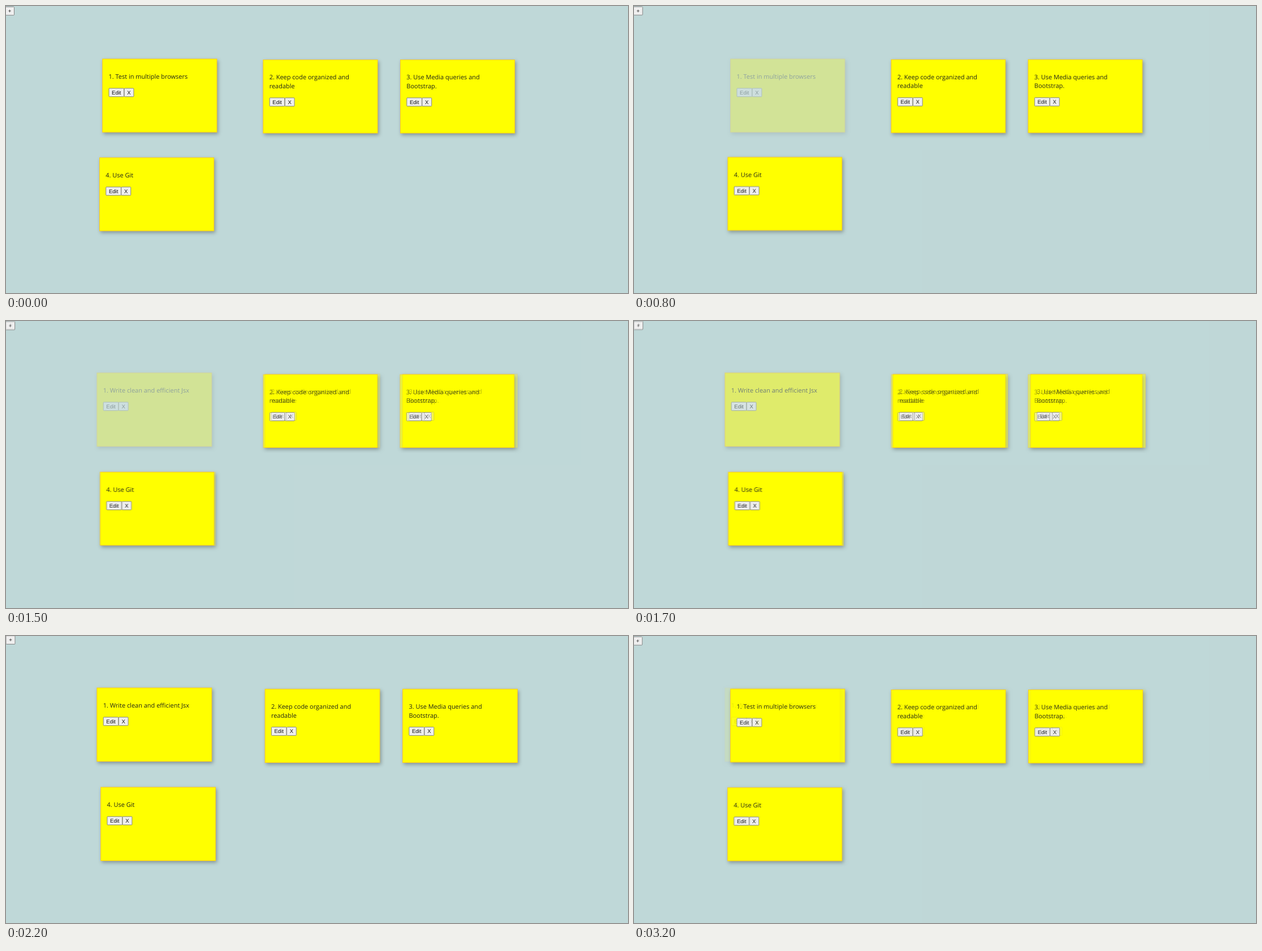
Write an HTML page that moves like this. It is 1100 px wide and 509 px high and loops after 3.3 s.

```html
<!DOCTYPE html>
<html lang="en">
<head>
<meta charset="utf-8">
<title>Sticky notes</title>
<style>
  html, body { margin: 0; width: 100%; height: 100%; overflow: hidden; background: #bfd8d8; }
  svg { display: block; width: 100%; height: 100%; }
  text { font: 10.97px "Open Sans", sans-serif; fill: #212518; text-rendering: geometricPrecision; }
  .label { font: 9.52px "Liberation Sans", Arial, sans-serif; fill: #111; text-anchor: middle; }
  .stage { fill: #bfd8d8; }
  .paper { fill: #ff0; stroke: #ffcb1a; stroke-width: 1px; filter: drop-shadow(2px 3.5px 3px rgba(0, 0, 0, .3)); }
  .button { fill: #efefef; stroke: #858585; stroke-width: 1px; }
</style>
</head>
<body>
<svg id="board" viewBox="0 0 1100 509"></svg>
<script>
const board = document.getElementById('board');
const LINE = 15.4, STEP = 100, STEPS = 11;

const rect = (cls, x, y, w, h, r = 0) =>
  `<rect class="${cls}" x="${x}" y="${y}" width="${w}" height="${h}" rx="${r}"/>`;

const button = (x, y, w, label) =>
  rect('button', x + .5, y + .5, w - 1, 14.8, 1) +
  `<text class="label" x="${x + w / 2}" y="${y + 11.2}">${label}</text>`;

function note(x, y, width, ...lines) {
  const left = x + 11.3;
  const buttonTop = y + 36.6 + lines.length * LINE;
  return rect('paper', x + .5, y + .5, width - 1, width * .644 - 1) +
    lines.map((line, i) => `<text x="${left}" y="${y + 35.4 + i * LINE}">${line}</text>`).join('') +
    button(left, buttonTop, 27.6, 'Edit') +
    button(left + 27.1, buttonTop, 17.8, 'X');
}

const keepCode = (x, y, w) => note(x, y, w, '2. Keep code organized and', 'readable');
const useMedia = (x, y, w) => note(x, y, w, '3. Use Media queries and', 'Bootstrap.');
const useGit = (x, y, w) => note(x, y, w, '4. Use Git');
const addButton = (x, y) => button(x, y, 17, '+');

const scenes = [
  [addButton(-2, 1), note(170.2, 93.5, 203.2, '1. Test in multiple browsers'),
    keepCode(454.4, 95, 203.2), useMedia(697, 95, 203.2), useGit(165, 268.5, 203.2)],
  [addButton(-1, .7),
    keepCode(454.5, 94.5, 202.7), useMedia(696.5, 94.5, 202.7), useGit(165.6, 267.5, 202.7)],
  [addButton(-.5, -.8), note(160.4, 91.5, 203.9, '1. Write clean and efficient Jsx'),
    keepCode(457.6, 93.7, 203.9), useMedia(701.1, 93.7, 203.9), useGit(167.2, 267.7, 203.9)],
].map(parts => {
  const layer = document.createElementNS('http://www.w3.org/2000/svg', 'g');
  layer.innerHTML = rect('stage', 0, 0, 1100, 509) + parts.join('');
  return layer;
});

// Each scene rests for two steps, then dissolves into the next by tenths.
let shown = -1;
function draw() {
  const tick = Math.floor(performance.now() / STEP) % (STEPS * scenes.length);
  if (tick !== shown) {
    shown = tick;
    const index = Math.floor(tick / STEPS);
    const current = scenes[index], next = scenes[(index + 1) % scenes.length];
    current.setAttribute('opacity', 1);
    next.setAttribute('opacity', Math.max(0, tick % STEPS - 1) / 10);
    board.replaceChildren(current, next);
  }
  requestAnimationFrame(draw);
}
draw();
</script>
</body>
</html>
```
